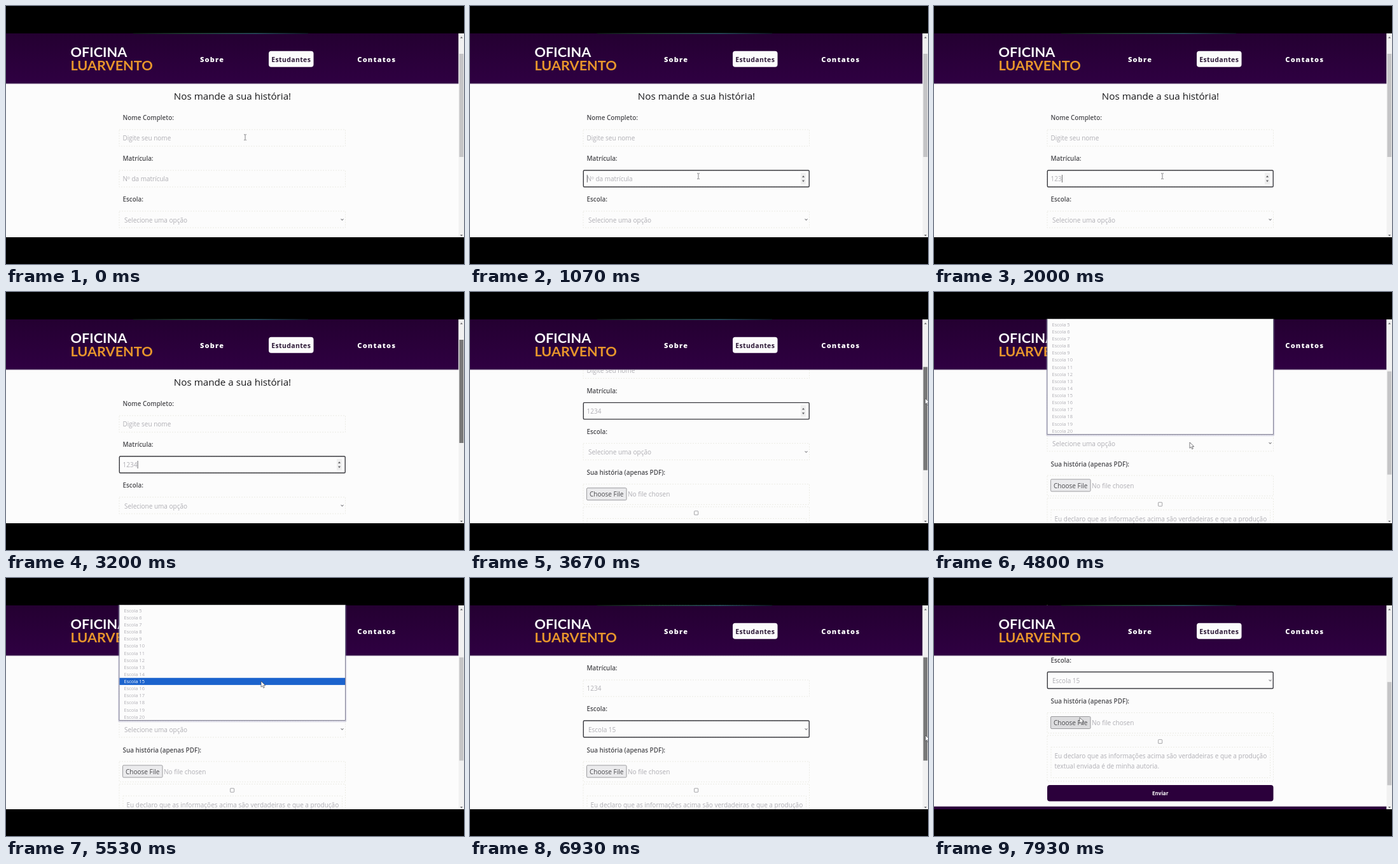
An HTML page that plays this animation: 720x405 px, repeating every 8 s.

```html
<!DOCTYPE html>
<html lang="pt">
<head>
<meta charset="utf-8">
<style>
html, body { margin: 0; width: 100%; height: 100%; overflow: hidden; background: #000; }
svg { display: block; width: 720px; height: 405px; }
text { font-family: "Open Sans", "Noto Sans", sans-serif; font-size: 10px; }
.label { font-size: 9.9px; font-weight: 600; fill: #4a4a4e; }
.soft { fill: #afaeb4; }
.logo { font-family: Lato, sans-serif; font-size: 21.7px; font-weight: 700; }
.nav { font-size: 11px; font-weight: 800; letter-spacing: 1.2px; fill: #fdfdfd; }
.faint { fill: none; stroke: #ebebe4; stroke-dasharray: 2 2; }
.focus { fill: none; stroke: #3c3c42; stroke-width: 1.4; }
.item { font-size: 7.5px; }
</style>
</head>
<body>
<svg id="stage" viewBox="0 0 720 405"></svg>
<script>
const LOOP = 8000;
const VIEW = { top: 43, bottom: 363, right: 711.5 };
const FIELD = { x: 178, w: 355.5, h: 26 };
const ROW = 11.13, LAST_ROW = 218;
const PURPLE = '#2b003b', PAPER = '#fcfcfc', INK = '#4a4a4e';
const stage = document.getElementById('stage');

const text = (x, y, str, cls, extra = '') => `<text x="${x}" y="${y}" class="${cls}" ${extra}>${str}</text>`;
const rect = (x, y, w, h, extra) => `<rect x="${x}" y="${y}" width="${w}" height="${h}" ${extra}/>`;
const field = (y, id) =>
  rect(FIELD.x, y, FIELD.w, FIELD.h, 'class="faint"') +
  (id ? rect(FIELD.x + .3, y, FIELD.w - .6, FIELD.h, `id="${id}" rx="1.5" class="focus"`) : '');
const triangle = (x, y, dy) => `<path d="M${x - 2} ${y}h4l-2 ${dy}z" fill="#66666a"/>`;

const form =
  text(356, 147, 'Nos mande a sua história!', '', 'text-anchor="middle" fill="#18181a" style="font-size:15.2px;font-weight:500"') +
  text(183.5, 178.5, 'Nome Completo:', 'label') +
  field(194) + text(183.5, 211, 'Digite seu nome', 'soft') +
  text(183.5, 243, 'Matrícula:', 'label') +
  field(258, 'idFocus') + text(183.5, 275.2, '', 'soft', 'id="idText"') +
  rect(0, 265, .8, 12, `id="caret" fill="${INK}"`) +
  `<g id="spin">${rect(520, 262, 8, 18, 'fill="#efefef"')}${triangle(524, 269, -3)}${triangle(524, 273.5, 3)}</g>` +
  text(183.5, 307, 'Escola:', 'label') +
  field(322, 'schoolFocus') + text(186, 339.5, '', 'soft', 'id="schoolText"') +
  '<path d="M526.5 334.2l2 2 2-2" fill="none" stroke="#88888c" stroke-width="1.1"/>' +
  text(183.5, 371.5, 'Sua história (apenas PDF):', 'label') +
  rect(FIELD.x, 386, FIELD.w, 32, 'class="faint"') +
  rect(183.5, 392, 62.5, 19, 'id="fileBtn" rx="1.5" stroke="#929296" stroke-width=".9"') +
  text(188, 405.5, 'Choose File', '', `fill="${INK}"`) +
  text(248, 405.5, 'No file chosen', 'soft') +
  rect(FIELD.x, 421.5, FIELD.w, 72, 'class="faint"') +
  rect(352.6, 428.2, 6, 6, 'rx=".6" fill="#fff" stroke="#98989c" stroke-width=".9"') +
  rect(184, 440, 344.5, 48, 'class="faint"') +
  text(189.5, 457.8, 'Eu declaro que as informações acima são verdadeiras e que a produção', 'soft') +
  text(189.5, 473.8, 'textual enviada é de minha autoria.', 'soft') +
  rect(FIELD.x, 499.5, FIELD.w, 25.5, `rx="4" fill="${PURPLE}"`) +
  text(355.7, 515.4, 'Enviar', '', 'text-anchor="middle" fill="#fdfdfd" style="font-size:8px;font-weight:700"') +
  rect(0, 533, VIEW.right, 40, `fill="${PURPLE}"`) +
  rect(0, 532.3, VIEW.right, .8, 'fill="#cfcad4"');

const header =
  rect(0, VIEW.top, VIEW.right, 79, 'fill="url(#bar)"') +
  rect(0, 121.6, VIEW.right, .9, 'fill="#b5aabb"') +
  rect(200, 42.4, 275, 1.4, 'fill="url(#strip)"') +
  text(101.5, 80, 'OFICINA', 'logo', 'fill="#fdfdfd"') +
  text(101.5, 101, 'LUARVENTO', 'logo', 'fill="#e8962c"') +
  text(305, 87.5, 'Sobre', 'nav') +
  rect(413, 70.8, 70.5, 25, `rx="4" fill="${PAPER}"`) +
  text(417.3, 87.5, 'Estudantes', '', 'fill="#2c1836" style="font-size:10.5px;font-weight:700;letter-spacing:.35px"') +
  text(552.3, 87.5, 'Contatos', 'nav');

const scrollbar =
  rect(VIEW.right, VIEW.top, 8.5, 320, 'fill="#f1f1f1"') +
  triangle(716, 50.5, -2.5) + triangle(716, 359, 2.5) +
  rect(712.6, 75, 6.6, 162, 'id="thumb"');

let items = '';
for (let n = 0; n <= 20; n++)
  items += text(185.5, (LAST_ROW + 2.7 - (20 - n) * ROW).toFixed(2), n ? 'Escola ' + n : 'Selecione uma opção', 'item soft', `id="item${n}"`);
const menu =
  rect(FIELD.x - .7, 20, FIELD.w + 1.4, 205, 'rx="1" fill="none" stroke="#8c88b0" stroke-opacity=".3" stroke-width="2.5"') +
  rect(FIELD.x, 20, FIELD.w, 203.5, `fill="${PAPER}" stroke="#77758c" stroke-width=".9"`) +
  rect(FIELD.x + .5, 0, FIELD.w - 1, ROW, 'id="hover" fill="#1b63cd"') + items;

stage.innerHTML = `
<defs>
  <clipPath id="view">${rect(0, VIEW.top - .8, 720, VIEW.bottom - VIEW.top + .8, '')}</clipPath>
  <linearGradient id="bar" x2="0" y2="1">
    <stop offset="0" stop-color="#240031"/><stop offset="1" stop-color="#2f0042"/>
  </linearGradient>
  <linearGradient id="strip">
    <stop offset="0" stop-color="#101a18"/><stop offset=".3" stop-color="#24503a"/>
    <stop offset=".7" stop-color="#2d6670"/><stop offset="1" stop-color="#101a28"/>
  </linearGradient>
</defs>
${rect(0, 0, 720, 405, '')}
<g clip-path="url(#view)">
  ${rect(0, VIEW.top, 720, 320, `fill="${PAPER}"`)}
  <g id="form">${form}</g>
  ${header}${scrollbar}
  <g id="menu">${menu}</g>
  <path id="arrow" d="M0 0v9.2l2.2-2 1.5 3.4 1.6-.7-1.5-3.3h3z" fill="#fff" stroke="#444448" stroke-width=".7"/>
  <path id="beam" d="M-2-4.2h1.4l.6.6.6-.6H2M0-3.6v7.4M-2 4.4h1.4l.6-.6.6.6H2" fill="none" stroke="#66666a" stroke-width=".8"/>
</g>`;

const el = {};
stage.querySelectorAll('[id]').forEach(node => el[node.id] = node);
const show = (node, on) => node.setAttribute('visibility', on ? 'visible' : 'hidden');
const move = (node, x, y) => node.setAttribute('transform', `translate(${x.toFixed(2)} ${y.toFixed(2)})`);

// Eased interpolation through [time, ...values] keys
function track(keys, t) {
  const i = keys.findIndex(k => k[0] > t);
  if (i < 0) return keys[keys.length - 1].slice(1);
  if (i === 0) return keys[0].slice(1);
  const a = keys[i - 1], b = keys[i];
  const p = (t - a[0]) / (b[0] - a[0]), e = p * p * (3 - 2 * p);
  return a.slice(1).map((v, j) => v + (b[j + 1] - v) * e);
}

const MOUSE = [
  [0, 376, 206], [150, 376, 206], [650, 359, 267], [2450, 359, 267],
  [3000, 722, 124], [3250, 722, 124], [3800, 714.5, 174], [4200, 714.5, 174],
  [4650, 402, 236], [4950, 402, 236], [5450, 401, 162], [6100, 401, 162],
  [6650, 716, 247], [6950, 716, 247], [7350, 716, 285], [7450, 716, 285], [7880, 229, 219]
];
const SCROLL = [[3250, 0], [3800, 98], [6950, 98], [7350, 174.5]];
const KEYS = [1250, 1550, 1850, 2110];
const FOCUS_ID = 750, OPEN = 4800, PICK = 5950;

function draw(t) {
  const [mx, my] = track(MOUSE, t);
  const [scroll] = track(SCROLL, t);
  move(el.form, 0, -scroll);
  const over = y => mx > FIELD.x && mx < FIELD.x + FIELD.w && my + scroll > y && my + scroll < y + FIELD.h;

  const typed = KEYS.filter(k => k <= t);
  const onId = t >= FOCUS_ID && t < OPEN;
  const blink = t - (typed.length ? typed[typed.length - 1] : FOCUS_ID);
  el.idText.textContent = typed.length ? '1234'.slice(0, typed.length) : 'Nº da matrícula';
  el.caret.setAttribute('x', 183.8 + typed.length * 5.72);
  show(el.idFocus, onId);
  show(el.caret, onId && blink % 1000 < 500);
  show(el.spin, onId || (t < OPEN && over(258)));

  const open = t >= OPEN && t < PICK;
  show(el.schoolFocus, t >= PICK);
  el.schoolText.textContent = t >= PICK ? 'Escola 15' : 'Selecione uma opção';
  el.menu.setAttribute('display', open ? 'inline' : 'none');
  const row = my < 223 ? Math.min(20, 20 + Math.round((my - LAST_ROW) / ROW)) : 0;
  el.hover.setAttribute('y', LAST_ROW - (20 - row) * ROW - ROW / 2);
  for (let n = 0; n <= 20; n++) el['item' + n].style.fill = n === row ? '#fff' : '';

  const onFile = mx > 183 && mx < 246 && my + scroll > 392 && my + scroll < 411;
  el.fileBtn.setAttribute('fill', onFile ? '#dcdcde' : '#ebebed');

  const dragging = (t >= 3100 && t < 3900) || (t >= 6850 && t < 7420);
  el.thumb.setAttribute('y', 75 + scroll * .506);
  el.thumb.setAttribute('fill', dragging ? '#787878' : mx > VIEW.right ? '#a8a8a8' : '#c4c4c6');

  const beam = !open && (over(194) || over(258)) && my > 122;
  show(el.beam, beam);
  show(el.arrow, !beam);
  move(beam ? el.beam : el.arrow, mx, my);
}

const start = performance.now();
function tick() {
  draw((performance.now() - start) % LOOP);
  requestAnimationFrame(tick);
}
tick();
</script>
</body>
</html>
```
